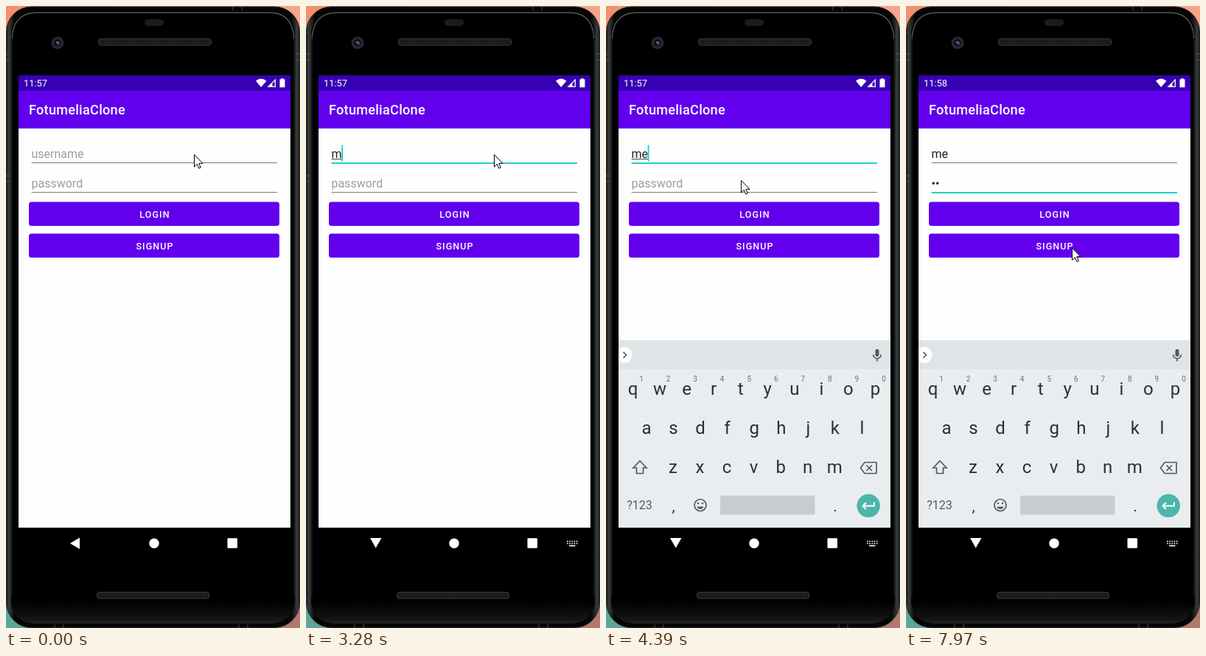
Recreate the animation shown at these times as an HTML page. Size 399 by 843 pixels, loop 8 s.

```html
<!DOCTYPE html>
<html lang="en">
<head>
<meta charset="utf-8">
<title>Login form demo</title>
<style>
  html, body { margin: 0; width: 100%; height: 100%; overflow: hidden; background: #000; }
  svg { display: block; font-family: Roboto, sans-serif; }
  .field { font-size: 16px; }
  .button { font-size: 12.5px; font-weight: 500; letter-spacing: 1.1px; fill: #fff; text-anchor: middle; }
  #keyboard text { text-anchor: middle; fill: #263238; }
  .line { fill: none; stroke: #4f5b61; stroke-width: 1.7; }
</style>
</head>
<body>
<svg width="399" height="843" viewBox="0 0 399 843">
  <defs>
    <linearGradient id="top"><stop stop-color="#f2906f"/><stop offset="1" stop-color="#f4a58b"/></linearGradient>
    <linearGradient id="bottom"><stop stop-color="#5aa79a"/><stop offset="1" stop-color="#b5766c"/></linearGradient>
    <linearGradient id="rim">
      <stop stop-color="#171717"/><stop offset=".008" stop-color="#3b3d3d"/><stop offset=".018" stop-color="#202121"/>
      <stop offset=".03" stop-color="#050505"/><stop offset=".97" stop-color="#050505"/>
      <stop offset=".982" stop-color="#202121"/><stop offset=".992" stop-color="#3b3d3d"/><stop offset="1" stop-color="#171717"/>
    </linearGradient>
    <linearGradient id="chin" x2="0" y2="1"><stop stop-color="#000"/><stop offset=".8" stop-color="#141414"/><stop offset="1" stop-color="#222"/></linearGradient>
    <pattern id="mesh" width="3" height="3" patternUnits="userSpaceOnUse">
      <rect width="3" height="3" fill="#161616"/><circle cx="1.5" cy="1.5" r=".8" fill="#363636"/>
    </pattern>
    <clipPath id="screen"><rect x="17" y="94" width="369" height="621"/></clipPath>
  </defs>

  <!-- phone body -->
  <rect width="399" height="422" fill="url(#top)"/>
  <rect y="422" width="399" height="421" fill="url(#bottom)"/>
  <rect x=".5" y="1" width="398" height="841.5" rx="34" fill="url(#rim)" stroke="#222"/>
  <rect x="7" y="8" width="385" height="828" rx="30"/>
  <path d="M7 806H392Q390 834 362 837H37Q9 834 7 806" fill="url(#chin)"/>
  <path d="M8 44Q10 10 40 9H359Q389 10 391 44" fill="none" stroke="#555" stroke-width="1.3"/>
  <path d="M8 44V800M391 44V800" stroke="#232424"/>
  <path d="M0 65H6M0 73H6M0 230H6M0 238H6M393 65H399M393 73H399M308 1V6M320 1V6M66 838V843M78 838V843M316 838V843M328 838V843" stroke="#505050"/>
  <rect x="188" y="18" width="26" height="9" rx="4.5" fill="#1b1b1b"/>
  <circle cx="70" cy="50" r="8.5" fill="#292929"/>
  <circle cx="70" cy="50" r="5" fill="#0d111d"/>
  <circle cx="71" cy="50.500" r="2.200" fill="#34487e"/>
  <circle cx="69.500" cy="49" r=".9" fill="#a9bbe8"/>
  <g fill="url(#mesh)" stroke="#3b3b3b">
    <rect x="125.500" y="44.500" width="153" height="8.500" rx="3"/>
    <rect x="123.500" y="794.500" width="152" height="8.500" rx="3"/>
  </g>

  <!-- app -->
  <rect x="17" y="94" width="369" height="613" fill="#fefefe"/>
  <rect x="17" y="94" width="369" height="72" fill="#6200ee"/>
  <rect x="17" y="94" width="369" height="21" fill="#3700b3"/>
  <g fill="#fff">
    <text id="clock" x="24" y="109.300" font-size="12.900"></text>
    <text x="31" y="147" font-size="18.200" font-weight="500" letter-spacing=".22">FotumeliaClone</text>
    <path d="M339 101.500Q346 95.500 353.500 101.500L346.200 110Z"/>
    <path d="M366 98.500V110H354.500ZM364.700 101.500L361.500 104.700V108.800H364.700Z" fill-rule="evenodd"/>
    <path d="M373.500 98H376.500V99.200H378.500V110.300H371.500V99.200H373.500Z"/>
  </g>
  <rect id="userLine" x="34.500" width="333.500"/>
  <rect id="passLine" x="34.500" width="333.500"/>
  <text id="user" class="field" x="34.500" y="206"></text>
  <text id="pass" class="field" x="34.500" y="246"></text>
  <rect id="composing" x="34.500" y="207" height="1" fill="#444"/>
  <rect id="caret" width="1.700" height="22" fill="#12cdbd"/>
  <g fill="#6200ee">
    <rect x="31" y="265.500" width="340" height="32.500" rx="3.500"/>
    <rect x="31" y="308.500" width="340" height="32.500" rx="3.500"/>
  </g>
  <text class="button" x="202" y="287">LOGIN</text>
  <text class="button" x="202" y="330">SIGNUP</text>

  <!-- navigation bar -->
  <g fill="#fff">
    <path id="back"/>
    <circle cx="201" cy="728.200" r="6.700"/>
    <rect x="300.500" y="721.300" width="13.500" height="13.500" rx="1"/>
    <g id="imeIcon" stroke="#fff" stroke-width="1.600">
      <path d="M354 725.500H368.500M354 728.500H368.500" stroke-dasharray="1.700 1.500"/>
      <path d="M357 731.500H365.500"/>
    </g>
  </g>

  <g clip-path="url(#screen)">
    <g id="keyboard">
      <rect x="17" y="453" width="369" height="254" fill="#e9edf0"/>
      <rect x="17" y="453" width="369" height="39.500" fill="#e0e4e7"/>
      <circle cx="24.500" cy="473" r="11" fill="#fff"/>
      <path class="line" d="M23.500 469L27.500 473L23.500 477" stroke="#222"/>
      <rect x="365.500" y="465" width="5" height="10" rx="2.500" fill="#4f5b61"/>
      <path class="line" d="M362.700 472.500A5.300 5.300 0 0 0 373.300 472.500M368 478V481.500"/>
      <path class="line" d="M46 616.500L55 626H50.500V633.500H41.500V626H37Z"/>
      <path class="line" d="M351 618.500H367V633.500H351L345.500 626ZM353.500 622.500L361 630M361 622.500L353.500 630"/>
      <circle class="line" cx="128" cy="676.500" r="8"/>
      <path d="M123.500 678.500H132.500A4.700 4.700 0 0 1 123.500 678.500" fill="#4f5b61"/>
      <circle cx="125" cy="674" r="1.300" fill="#4f5b61"/>
      <circle cx="131" cy="674" r="1.300" fill="#4f5b61"/>
      <rect x="155" y="663.500" width="128.500" height="26" rx="2" fill="#c8ccd0"/>
      <circle cx="356.200" cy="677.300" r="15.800" fill="#4db6ac"/>
      <path class="line" d="M364 672.500V677.500H349M353 673L348.500 677.500L353 682" style="stroke:#fff;stroke-width:1.900"/>
      <text x="45.500" y="682" font-size="16" style="fill:#4f5b61">?123</text>
      <text x="91.500" y="685" font-size="21">,</text>
      <text x="311" y="685" font-size="21">.</text>
    </g>
  </g>
  <path id="mouse" d="M.5 .5V17L4.300 13.300L6.800 19L9.300 18L6.800 12.300H12Z" fill="#fff" stroke="#000" stroke-linejoin="round"/>
</svg>
<script>
const LOOP = 8000;
const $ = id => document.getElementById(id);
const set = (id, attrs) => {
  for (const name in attrs) $(id).setAttribute(name, attrs[name]);
};
const show = (id, visible) => set(id, { visibility: visible ? 'visible' : 'hidden' });

function addKey(label, x, y, size, color = '#263238') {
  const key = document.createElementNS('http://www.w3.org/2000/svg', 'text');
  key.textContent = label;
  key.style.fill = color;
  key.setAttribute('x', x);
  key.setAttribute('y', y);
  key.setAttribute('font-size', size);
  $('keyboard').append(key);
}
['qwertyuiop', 'asdfghjkl', 'zxcvbnm'].forEach((row, r) => {
  [...row].forEach((letter, i) => {
    const x = [36.5, 55, 91][r] + 36.55 * i;
    addKey(letter, x, 527 + 53 * r, 24);
    if (r === 0) addKey((i + 1) % 10, x + 11.5, 509, 10, '#667177');
  });
});

const start = {
  clock: '11:57', user: '', pass: '', userFocus: false, passFocus: false,
  userPressed: false, passPressed: false, composing: 0, caret: null,
  mouse: [255, 201], ime: false, keyboard: 0
};
const userCaret = x => ({ caret: [x, 188.5] });
const passCaret = x => ({ caret: [x, 228.5] });
const caretOff = { caret: null };

// Each step changes only the listed parts of the state.
const steps = [
  [710, { userFocus: true, userPressed: true, ...userCaret(34.5) }],
  [860, { userPressed: false }],
  [1270, caretOff],
  [1420, { ime: true }],
  [1680, userCaret(34.5)],
  [2190, caretOff],
  [2750, userCaret(34.5)],
  [3160, { user: 'm', ...userCaret(48.3) }],
  [3280, { composing: 14 }],
  [3820, { mouse: [254, 202], ...caretOff }],
  [3960, { mouse: [226, 221] }],
  [4080, { mouse: [200, 232], user: 'me', composing: 22.5, ...userCaret(56.7) }],
  [4230, { mouse: [183, 236], keyboard: 0.82 }],
  [4390, { keyboard: 1 }],
  [4540, { mouse: [176, 240] }],
  [4690, { mouse: [174.5, 242], ...caretOff }],
  [4950, { passFocus: true, passPressed: true }],
  [5100, { userFocus: false, passPressed: false, composing: 0, ...passCaret(34.5) }],
  [5510, caretOff],
  [6090, passCaret(34.5)],
  [6350, { pass: '•e', ...passCaret(48.3) }],
  [6910, caretOff],
  [7320, { mouse: [183, 254], ...passCaret(48.3) }],
  [7440, { mouse: [196, 269] }],
  [7580, { mouse: [218, 308], clock: '11:58' }],
  [7700, { mouse: [223, 327] }],
  [7850, { pass: '••', ...caretOff }],
  [7970, { mouse: [225, 327.5] }]
];

function drawField(name, value, hint, y, focused, pressed) {
  $(name).textContent = value || hint;
  set(name, { fill: value ? '#212121' : pressed ? '#777' : '#9d9d9d' });
  set(name + 'Line', { y, height: focused ? 2 : 1, fill: focused ? '#20d1c3' : '#7c7c7c' });
}

function draw() {
  const time = performance.now() % LOOP;
  const s = Object.assign({}, start, ...steps.filter(([at]) => at <= time).map(([, change]) => change));

  $('clock').textContent = s.clock;
  drawField('user', s.user, 'username', 212, s.userFocus, s.userPressed);
  drawField('pass', s.pass, 'password', 252, s.passFocus, s.passPressed);
  set('composing', { width: s.composing });
  show('caret', s.caret);
  if (s.caret) set('caret', { x: s.caret[0], y: s.caret[1] });
  set('back', { d: s.ime ? 'M87 721H102.500L94.700 734.500Z' : 'M100 720.500V736L87 728.200Z' });
  show('imeIcon', s.ime);
  show('keyboard', s.keyboard);
  set('keyboard', { opacity: s.keyboard, transform: `translate(0 ${s.keyboard < 1 ? 7.7 : 0})` });
  set('mouse', { transform: `translate(${s.mouse})` });
  requestAnimationFrame(draw);
}
draw();
</script>
</body>
</html>
```
